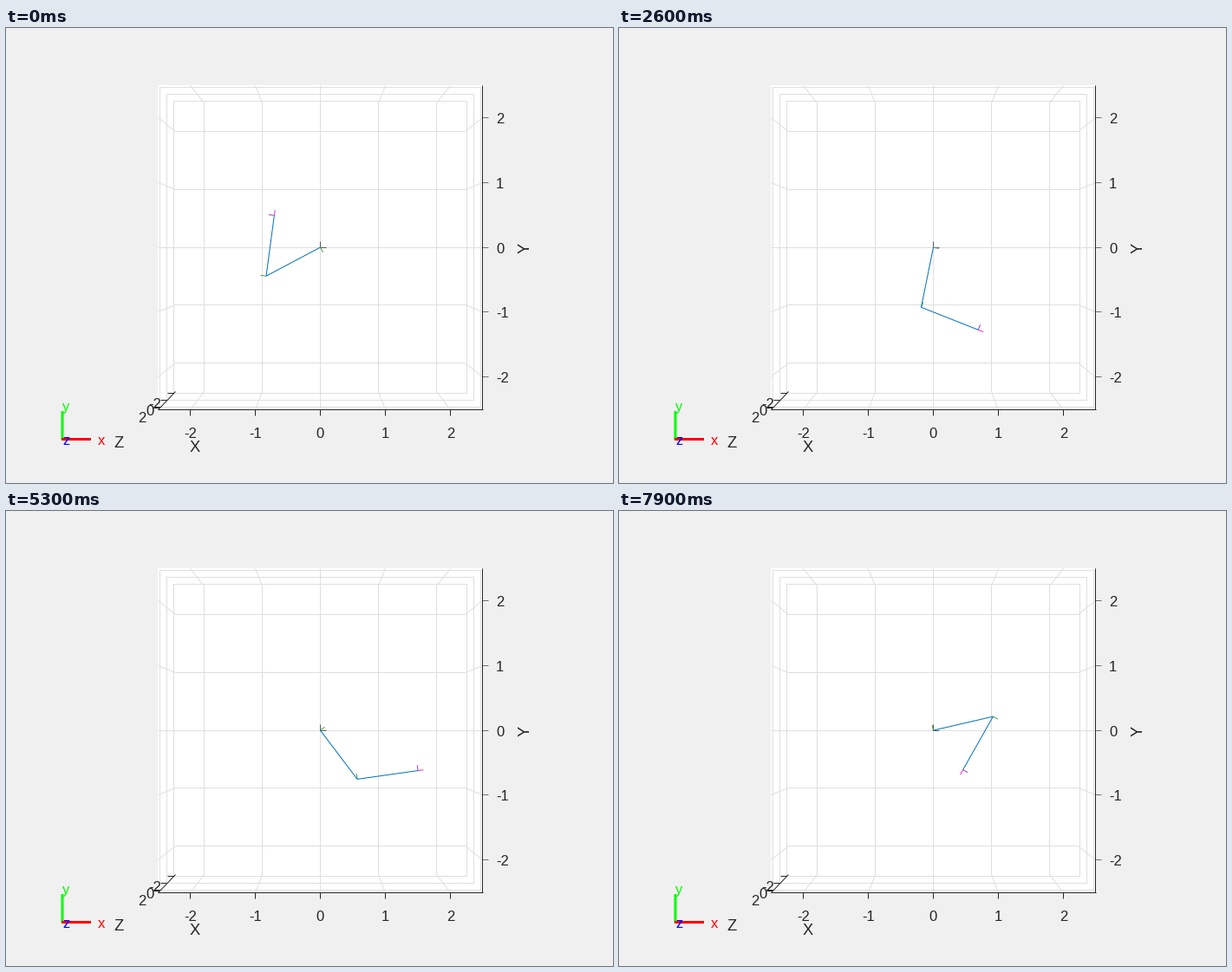
A matplotlib script for the animation above (8 s loop, 700x525 px).

```python
import numpy as np
import matplotlib.pyplot as plt
from matplotlib.animation import FuncAnimation

W, H, DPI = 700, 525, 100
FRAMES, STEP = 80, 100
PX = 72 / DPI
CX, CY, ASPECT = 362.5, 253.1, 0.997
INK, GRID, BLUE = "#262626", "#dfdfdf", "#0072bd"

plt.rcParams["font.family"] = "Liberation Sans"
fig = plt.figure(figsize=(W / DPI, H / DPI), dpi=DPI, facecolor="#f0f0f0")
ax = fig.add_axes([0, 0, 1, 1])
ax.set_xlim(0, W)
ax.set_ylim(H, 0)
ax.axis("off")


def project(x, y, z=0.0):
    """Perspective view straight down the z axis."""
    s = 1 / (0.014135 - 0.0003206 * z)
    return CX + s * x, CY - ASPECT * s * y


def line(points, color, width=1.0, order=2):
    xs, ys = zip(*points)
    return ax.plot(xs, ys, color=color, lw=width * PX, zorder=order,
                   solid_capstyle="butt", snap=False)[0]


def crisp(points, color, order=2):
    """Thin line through pixel centres."""
    return line(np.floor(points) + 0.5, color, order=order)


def label(x, y, s, size=16.67, color=INK, **kw):
    kw = {"ha": "center", "va": "baseline", **kw}
    ax.text(x, y, s, fontsize=size * PX, color=color, zorder=5, **kw)


def draw_box():
    e = 2.5
    x0, y0 = project(-e, e, e)
    x1, y1 = project(e, -e, e)
    ax.fill([x0, x1, x1, x0], [y0, y0, y1, y1], color="white", lw=0, zorder=0)

    for v in (-2, -1, 0, 1, 2):
        crisp([project(v, e, e), project(v, e, -e),
               project(v, -e, -e), project(v, -e, e)], GRID)
        crisp([project(-e, v, e), project(-e, v, -e),
               project(e, v, -e), project(e, v, e)], GRID)
    for z in (-2, 0, 2):
        corners = [(-e, -e), (e, -e), (e, e), (-e, e), (-e, -e)]
        crisp([project(x, y, z) for x, y in corners], GRID)

    crisp([(x0, y1), (x1 + 1, y1)], INK, 3)
    crisp([(x1, y0), (x1, y1)], INK, 3)
    crisp([(x0, y1), project(-e, -e, -e)], INK, 3)

    for v in (-2, -1, 0, 1, 2):
        x, _ = project(v, 0, e)
        _, y = project(0, v, e)
        crisp([(x, y1), (x, y1 + 7)], INK)
        crisp([(x1, y), (x1 + 7, y)], "#707070")
        label(x, 473, str(v))
        label(565, y + 6.5, str(v), ha="left")
    for z, x, y in ((-2, 172, 439), (0, 166, 447), (2, 157, 455)):
        zx, zy = project(-e, -e, z)
        crisp([(zx, zy), (zx - 7, zy)], INK)
        label(x, y, str(z))

    label(218, 489, "X", 18.33)
    label(130.5, 484, "Z", 18.33)
    label(599.5, 253.5, "Y", 18.33, rotation=90, va="center")


def draw_compass():
    line([(65, 475), (65, 442)], "#00ff00", 3)
    line([(64, 474.5), (98, 474.5)], "#ff0000", 3)
    for x, y, s, color in ((106, 481, "x", "#ff0000"), (65, 442, "y", "#00ff00"),
                           (65, 481, "z", "#0000ff")):
        label(x, y, s, color=color, ha="left")


# Key poses: time in s, absolute angles of both links in degrees
keys = np.array([
    (0.0, 208.0, 82.4),
    (1.6, 463.3, 10.5),
    (2.6, 618.8, -21.7),
    (4.2, 859.1, -28.0),
    (5.3, 1027.4, 8.0),
    (6.1, 1153.3, 57.1),
    (7.9, 1453.1, 240.6),
])
shoulder = np.polyfit(keys[:, 0], keys[:, 1], 5)
elbow = np.polyfit(keys[:, 0], keys[:, 2], 5)

draw_box()
draw_compass()
TRIAD = 0.09
crisp([project(0, 0.1), project(0, 0), project(0.1, 0)], "#5a5a5a", 6)

O = [(0, 0), (0, 0)]
arm = line(O, BLUE, order=8)
base_y = line(O, "#4f9f4f", order=7)
mid_y = line(O, "#4f9f4f", order=7)
tip_x = line(O, "#dd33dd", order=9)
tip_y = line(O, "#a040a8", order=9)


def unit(angle):
    return np.array([np.cos(angle), np.sin(angle)])


def place(artist, *points):
    artist.set_data(*zip(*(project(*p) for p in points)))


def update(i):
    t = i * STEP / 1000
    a = np.radians(np.polyval(shoulder, t))
    b = np.radians(np.polyval(elbow, t))
    root = np.zeros(2)
    joint = unit(a)
    tip = joint + unit(b)
    side_a, side_b = TRIAD * unit(a + np.pi / 2), TRIAD * unit(b + np.pi / 2)
    place(arm, root, joint, tip)
    place(base_y, root, root + side_a)
    place(mid_y, joint, joint + side_b)
    place(tip_x, tip, tip + TRIAD * unit(b))
    place(tip_y, tip, tip + side_b)
    return arm, base_y, mid_y, tip_x, tip_y


anim = FuncAnimation(fig, update, frames=FRAMES, interval=STEP,
                     repeat=True, repeat_delay=0, blit=False)
plt.show()
```
